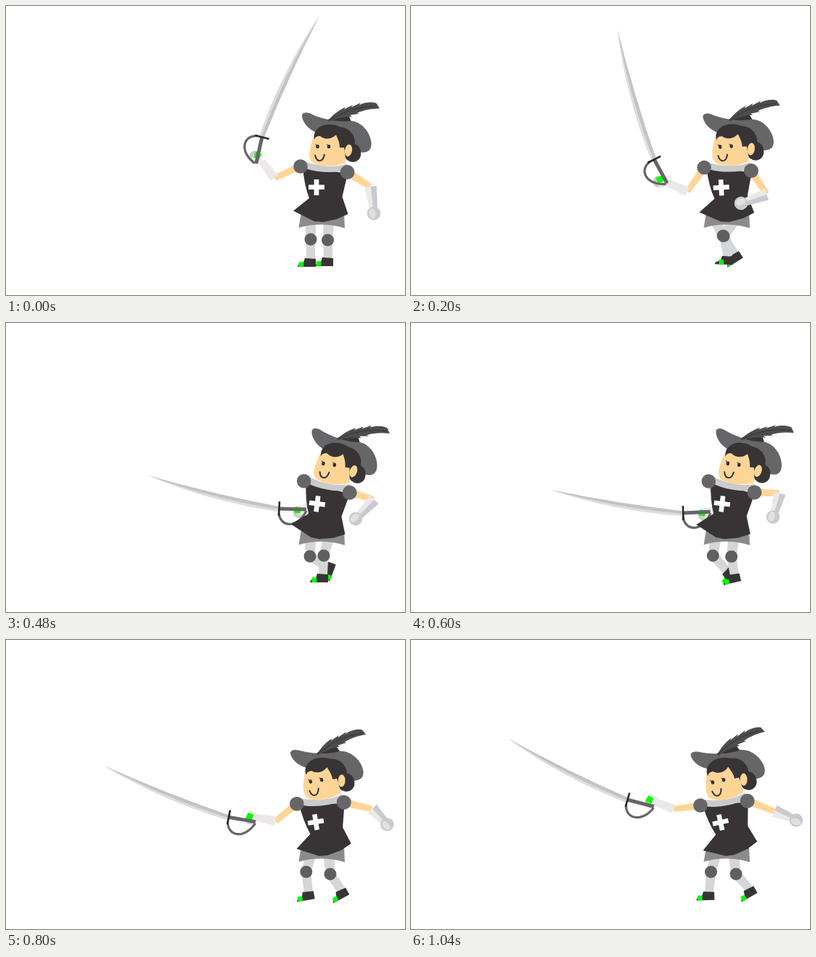
Recreate the animation shown at these times as an HTML page with a canvas. Size 550 by 400 pixels, loop 1.08 s.

```html
<!DOCTYPE html>
<html lang="en">
<head>
<meta charset="utf-8">
<title>Fencer</title>
<style>
html, body { margin: 0; width: 100%; height: 100%; overflow: hidden; background: #fff; }
canvas { display: block; }
</style>
</head>
<body>
<canvas id="stage" width="550" height="400"></canvas>
<script>
const ctx = document.getElementById('stage').getContext('2d');
const LOOP = 1080, STEP = 40, RAD = Math.PI / 180;

const C = {
  dark: '#383435', grey: '#666568', knee: '#5f5f61', skirt: '#8b8b8b',
  skin: '#ffd597', light: '#ebe8e7', steel: '#c9cacd', leg: '#d5d6d7',
  green: '#00ff00', feather: '#4d4c4e'
};

// Pose times; short tracks hold their last value.
const FULL = [0, 200, 320, 480, 560, 720, 880, 1040];
const WALK = [0, 200, 320, 480, 720, 880];

// Monotone cubic curve through the given values.
function track(times, values) {
  const n = values.length;
  const slope = i => (values[i + 1] - values[i]) / (times[i + 1] - times[i]);
  const tangent = i => {
    if (i === 0) return slope(0);
    if (i === n - 1) return 0;
    const a = slope(i - 1), b = slope(i);
    return a * b > 0 ? 2 * a * b / (a + b) : 0;
  };
  return t => {
    if (t >= times[n - 1]) return values[n - 1];
    let i = 0;
    while (t >= times[i + 1]) i++;
    const h = times[i + 1] - times[i], u = (t - times[i]) / h, v = 1 - u;
    return v * v * (1 + 2 * u) * values[i] + u * u * (3 - 2 * u) * values[i + 1]
      + h * u * v * (v * tangent(i) - u * tangent(i + 1));
  };
}
const point = (times, xs, ys) => {
  const x = track(times, xs), y = track(times, ys);
  return t => [x(t), y(t)];
};

const lean = track(FULL, [0, -3.1, 2.9, 7.2, 8, -3.7, -12, -12.6]);

const sword = {
  pos: point(FULL, [353, 335, 351, 376, 382, 324, 298, 298],
                   [181, 212, 237, 257, 262, 265, 224, 221]),
  turn: track(FULL, [101, 60, 38, 0, -5, 2.3, 12.4, 13])
};
const swordArm = {
  elbow: point(FULL, [370, 381, 411, 436, 437, 388, 363, 362],
                     [238, 257, 264, 248, 253, 265, 235.5, 234]),
  hand: point(FULL, [346.5, 343, 370, 402, 409, 351, 329, 329],
                    [207, 240, 259, 259, 263, 262, 225, 221])
};
const freeArm = {
  elbow: point(WALK, [502, 490, 497, 507, 508, 501], [250, 260, 258, 244, 231, 237]),
  hand: point(WALK, [507, 455, 461, 482, 515, 531], [287, 273, 269, 271, 263, 249.5])
};
const legs = [
  {
    hip: [420, 298],
    knee: point(WALK, [420, 430, 427, 419, 414.5, 413.5], [323, 318, 322, 323, 321, 321]),
    ankle: point(WALK, [420, 446, 448, 442, 426, 411], [350, 343, 340, 337, 348, 349]),
    turn: track(WALK, [0, -32, -51, -70, -24, -2]),
    slide: () => 0
  },
  {
    hip: [445, 298],
    knee: point(WALK, [443.5, 431, 433.5, 438, 445, 448], [324, 318.5, 320, 322, 324, 324]),
    ankle: point(WALK, [444, 437, 428, 437, 455, 466], [349, 347, 346, 348, 348, 344]),
    turn: track(WALK, [0, 2, 9, 0, -25, -30]),
    slide: track(WALK, [0, 4, 4, 1, 0, 0])
  }
];

const PIVOT = [434, 257.5], SHOULDER_L = [406, 222], SHOULDER_R = [470.5, 230];

const P = Object.fromEntries(Object.entries({
  skirt: 'M407 286 L403.5 307 Q435 298 467 307.5 L466 286 Z',
  tunic: 'M409 222 L471 232 L463.5 264 L471.5 288 L456 295 L437 299 L425 298 L396 283.5 L418 266 Q411 248 409 222 Z',
  collar: 'M414 216 L413 225 C430 231 452 231 467 228 L470 218 C450 225 430 221 414 216 Z',
  brim: 'M408 151 C410 146 417 147 424 151 C445 159 462 161 476 159 C494 161 505 181 503.5 193 C502 204 492 204 481 201 L430 176 C416 171 408 160 408 151 Z',
  crown: 'M440 159 L458 150 L471 149 L477 162 Q458 163 440 159 Z',
  feather: 'M443 160 C450 150 461 143 468 140 L466 143 L478 137 L476 140 L489 134 L487 137 C497 132 508 133 511 135 L515 142 C504 142 493 144 484 148 L487 149 L474 151 L477 153 C466 153 454 156 446 160 Z',
  quill: 'M446 158 C466 145 488 139 510 139',
  face: 'M423 183 C419 195 416 207 420 214 C427 223 450 224 468 217 L470 190 C465 176 430 172 423 183 Z',
  hair: 'M425 185 C422 172 434 163 447 164 C456 164 460 168 464 168 C474 170 482 179 481 191 C488 193 490 200 489 207 C487 216 477 218 472 214 C466 212 468 205 466 196 L460 196 C460 188 457 184 455 178 C450 184 440 186 433 180 C429 180 426 181 425 185 Z',
  mouth: 'M426 206 C428 217 437 217 439 205',
  blade: 'M-180 -46 Q-90 -20 0 -3 L0 4 Q-95 -10 -180 -46 Z',
  bladeEdge: 'M-180 -46 Q-93 -14 0 1 L0 4 Q-95 -10 -180 -46 Z',
  bow: 'M0 6 C2 26 26 28 38 3',
  boot: 'M-8 -1 L7 0 L7 11 L-18 11 L-17 8 L-10 5 Z'
}).map(([name, d]) => [name, new Path2D(d)]));

function fill(path, color) {
  ctx.fillStyle = color;
  ctx.fill(path);
}
function stroke(path, color, width) {
  ctx.strokeStyle = color;
  ctx.lineWidth = width;
  ctx.stroke(path);
}
function oval(x, y, rx, ry, color, turn = 0) {
  ctx.beginPath();
  ctx.ellipse(x, y, rx, ry, turn, 0, 7);
  ctx.fillStyle = color;
  ctx.fill();
}
const disc = ([x, y], r, color) => oval(x, y, r, r, color);
function line(x1, y1, x2, y2, color, width) {
  const p = new Path2D();
  p.moveTo(x1, y1);
  p.lineTo(x2, y2);
  stroke(p, color, width);
}
function square(x, y, size, color) {
  ctx.fillStyle = color;
  ctx.fillRect(x - size / 2, y - size / 2, size, size);
}
function placed([x, y], deg, draw) {
  ctx.save();
  ctx.translate(x, y);
  ctx.rotate(deg * RAD);
  draw();
  ctx.restore();
}
const along = (a, b, u) => [a[0] + (b[0] - a[0]) * u, a[1] + (b[1] - a[1]) * u];

// Tapered strip from a to b; l and r are the widths on each side at both ends.
function limb(a, b, l0, r0, l1, r1, color) {
  const dx = b[0] - a[0], dy = b[1] - a[1], d = Math.hypot(dx, dy) || 1;
  const nx = dy / d, ny = -dx / d;
  ctx.beginPath();
  ctx.moveTo(a[0] + nx * l0, a[1] + ny * l0);
  ctx.lineTo(b[0] + nx * l1, b[1] + ny * l1);
  ctx.lineTo(b[0] - nx * r1, b[1] - ny * r1);
  ctx.lineTo(a[0] - nx * r0, a[1] - ny * r0);
  ctx.fillStyle = color;
  ctx.fill();
}

function leaned([x, y], deg) {
  const c = Math.cos(deg * RAD), s = Math.sin(deg * RAD);
  const dx = x - PIVOT[0], dy = y - PIVOT[1];
  return [PIVOT[0] + dx * c - dy * s, PIVOT[1] + dx * s + dy * c];
}

function drawSword() {
  fill(P.blade, '#c3c3c4');
  fill(P.bladeEdge, '#dededf');
  stroke(P.bow, C.grey, 3.2);
  line(0, 0, 38, 1, C.grey, 5);
  line(1, -10, 0, 10, '#2a2829', 2.6);
}

function drawSwordArm(t, shoulder) {
  const elbow = swordArm.elbow(t), hand = swordArm.hand(t), turn = sword.turn(t);
  limb(shoulder, elbow, 5, 5, 4, 4, C.skin);
  placed(hand, turn, () => {
    oval(2, 3, 8, 8, C.steel);
    oval(5, 0, 7, 7, C.light);
  });
  limb(elbow, along(elbow, hand, 0.75), 6.5, 6.5, 5, 5, C.light);
  placed(hand, turn + 12, () => square(0, 0, 8.5, C.green));
  placed(sword.pos(t), turn, drawSword);
}

function drawFreeArm(t, shoulder) {
  const elbow = freeArm.elbow(t), hand = freeArm.hand(t);
  limb(shoulder, elbow, 5.5, 5.5, 4, 4, C.skin);
  const wrist = along(elbow, hand, 0.8);
  limb(elbow, wrist, 2, 8, 1, 5, C.light);
  limb(elbow, wrist, 9, -1, 6, 0, C.steel);
  disc(hand, 9.3, C.steel);
  const deg = Math.atan2(hand[1] - elbow[1], hand[0] - elbow[0]) / RAD;
  placed(hand, deg, () => oval(0, 2, 7, 4.5, '#e1dfdf'));
}

function drawLeg(leg, t) {
  const knee = leg.knee(t), ankle = leg.ankle(t);
  limb(leg.hip, knee, 7.5, 7.5, 6.5, 6.5, C.leg);
  limb(knee, ankle, 6.5, 6.5, 6, 6, C.leg);
  placed(ankle, leg.turn(t), () => {
    fill(P.boot, C.dark);
    square(-13 + leg.slide(t), 7.5, 6.6, C.green);
  });
}

function drawTorso() {
  fill(P.tunic, C.dark);
  ctx.fillStyle = '#fff';
  ctx.fillRect(417, 247.5, 22, 6.5);
  ctx.fillRect(424.7, 240, 6.6, 22);
}

function drawHead() {
  fill(P.collar, C.steel);
  fill(P.crown, C.dark);
  fill(P.brim, C.grey);
  fill(P.feather, C.feather);
  stroke(P.quill, C.dark, 1);
  fill(P.face, C.skin);
  fill(P.hair, C.dark);
  oval(472, 200, 5, 8.5, C.skin, 0.2);
  for (const x of [429.5, 445]) {
    oval(x, 194.5, 2.3, 2.8, C.dark);
    line(x - 3, 191, x, 194, C.dark, 1);
  }
  stroke(P.mouth, C.dark, 2);
}

function draw(t) {
  ctx.fillStyle = '#fff';
  ctx.fillRect(0, 0, 550, 400);

  const a = lean(t);
  const left = leaned(SHOULDER_L, a), right = leaned(SHOULDER_R, a);

  drawSwordArm(t, left);
  for (const leg of legs) drawLeg(leg, t);
  for (const leg of legs) disc(leg.knee(t), 8.5, C.knee);
  fill(P.skirt, C.skirt);

  ctx.save();
  ctx.translate(...PIVOT);
  ctx.rotate(a * RAD);
  ctx.translate(-PIVOT[0], -PIVOT[1]);
  drawTorso();
  drawHead();
  ctx.restore();

  drawFreeArm(t, right);
  disc(left, 9.8, C.grey);
  disc(right, 10, C.grey);
}

const start = performance.now();
function tick() {
  const t = Math.max(0, performance.now() - start) % LOOP;
  draw(Math.floor(t / STEP) * STEP);
  requestAnimationFrame(tick);
}
tick();
</script>
</body>
</html>
```
